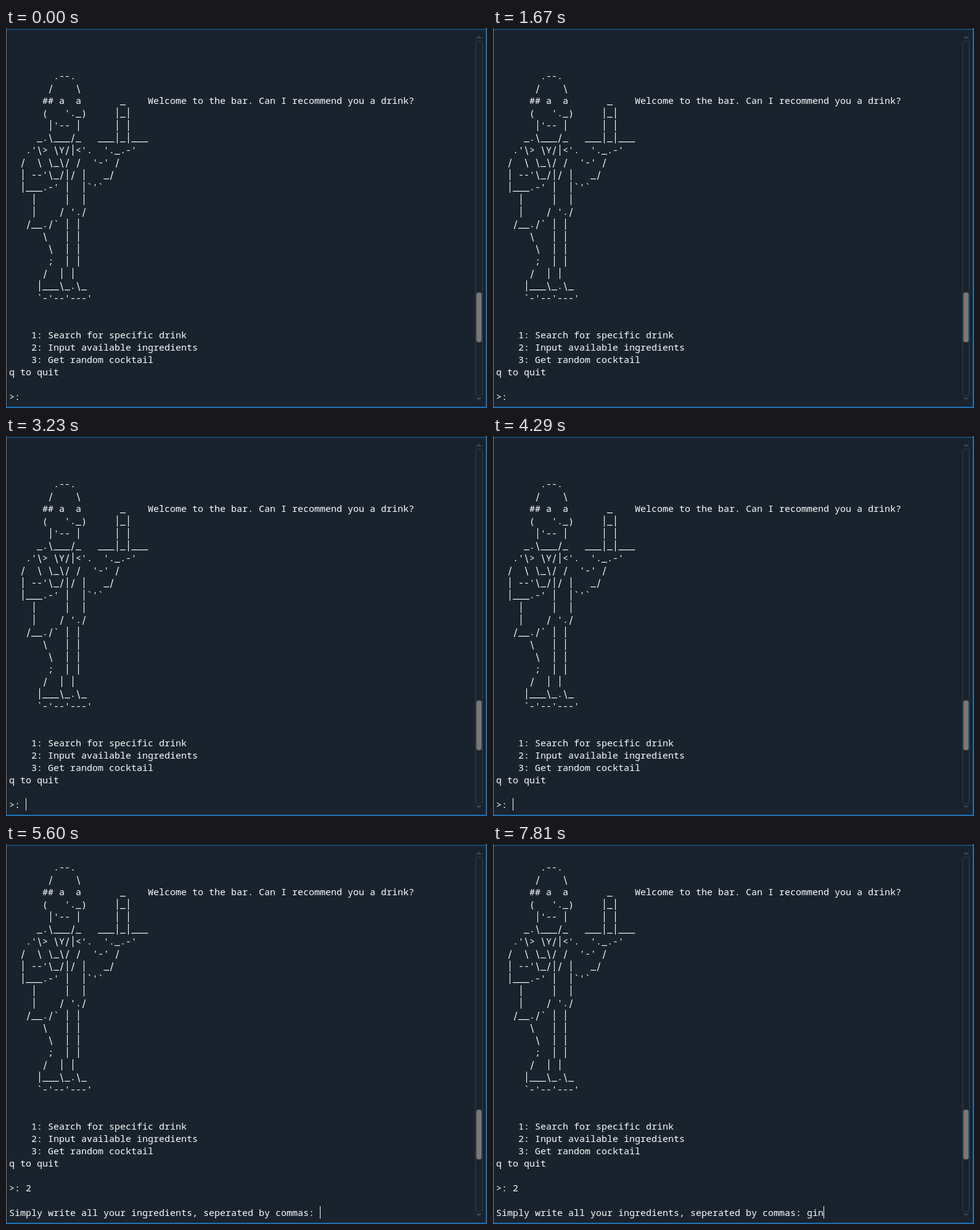
An HTML page for the animation above (8 s loop, 780x616 px).

```html
<!DOCTYPE html>
<html lang="en">
<head>
<meta charset="utf-8">
<title>Bar console</title>
<style>
  html, body { margin: 0; width: 100%; height: 100%; overflow: hidden; background: #19232d; }
  .stage { position: relative; width: 780px; height: 616px; overflow: hidden; background: #19232d; }
  .stage > * { position: absolute; }

  .console {
    left: 5px; top: 67px; margin: 0;
    font: 500 15px/20px "Noto Sans Mono", "DejaVu Sans Mono", monospace;
    color: #fff; white-space: pre;
  }
  .console i, .console b { display: inline-block; font-style: normal; font-weight: inherit; }
  .console i { transform: translateY(-1px) scaleY(1.18); }
  .console b { transform: translateY(1px) scaleY(1.35); }
  .console span { display: inline-block; }
  .caret { left: 32px; top: 587px; width: 1px; height: 20px; background: #fff; opacity: 0; }

  .console, .choice, .typed, .caret, .handle { animation: 8s step-end infinite; }
  .console { animation-name: scroll; }
  .choice { animation-name: choose; }
  .typed { animation-name: type; }
  .caret { animation-name: caret; }
  .handle { animation-name: handle; }

  @keyframes scroll { 0% { top: 67px } 70%, 100% { top: 27px } }
  @keyframes handle { 0% { top: 428px } 70%, 100% { top: 430px } }
  @keyframes choose { 0% { opacity: 0 } 58.875%, 100% { opacity: 1 } }
  @keyframes type {
    0% { clip-path: inset(0 27px 0 0) }
    95.25% { clip-path: inset(0 18px 0 0) }
    96.5% { clip-path: inset(0 9px 0 0) }
    97.625%, 100% { clip-path: inset(0) }
  }
  @keyframes caret {
    0% { left: 32px }
    58.875% { left: 41px }
    70% { left: 509px }
    95.25% { left: 518px }
    96.5% { left: 527px }
    97.625%, 100% { left: 536px }
    0%, 8.125%, 20.875%, 34.125%, 47.375%, 60.5%, 69.25%, 76.25%, 89% { opacity: 0 }
    .875%, 14.125%, 28%, 40.375%, 53.625%, 67%, 70%, 82.875%, 95.25%, 100% { opacity: 1 }
  }

  .top { left: 0; top: 2px; width: 780px; height: 1px; background: #1464a0; }
  .right { right: 0; top: 0; width: 2px; height: 616px; background: #1a72bb; }
  .bottom { left: 0; bottom: 0; width: 780px; height: 2px; background: #1a72bb; }
  .left { left: 0; top: 0; width: 1px; height: 616px; background: #7d858c; }
  .groove, .handle { box-sizing: border-box; border: 1px solid #32414b; border-radius: 4px; }
  .groove { left: 761px; top: 21px; width: 12px; height: 575px; }
  .handle { left: 762px; top: 428px; width: 10px; height: 82px; background: #787878; }
  .arrow { left: 762px; width: 10px; height: 5px; background: #32414b; }
  .up { top: 12px; clip-path: polygon(50% 0, 100% 100%, 0 100%); }
  .down { top: 599px; clip-path: polygon(0 0, 100% 0, 50% 100%); }
</style>
</head>
<body>
<div class="stage">
  <div class="top"></div>
  <div class="right"></div>
  <div class="bottom"></div>
  <div class="left"></div>
  <div class="arrow up"></div>
  <div class="groove"></div>
  <div class="handle"></div>
  <div class="arrow down"></div>
<pre class="console">
        .--.
       /    \
      ## a  a       _    Welcome to the bar. Can I recommend you a drink?
      (   '._)     |_|
       |'-- |      | |
     _.\___/_   ___|_|___
   .'\&gt; \Y/|&lt;'.  '._.-'
  /  \ \_\/ /  '-' /
  | --'\_/|/ |   _/
  |___.-' |  |`'`
    |     |  |
    |    / './
   /__./` | |
      \   | |
       \  | |
       ;  | |
      /  | |
     |___\_.\_
     `-'--'---'


    1: Search for specific drink
    2: Input available ingredients
    3: Get random cocktail
q to quit

&gt;: <span class="choice">2</span>

Simply write all your ingredients, seperated by commas: <span class="typed">gin</span></pre>
  <div class="caret"></div>
</div>
<script>
  // Lengthen bars and slashes so the drawing nearly joins between rows.
  const text = document.querySelector('.console');
  text.innerHTML = text.innerHTML.replace(/[|\\]|(?<!<)\//g, c => c === '|' ? '<i>|</i>' : `<b>${c}</b>`);
</script>
</body>
</html>
```
